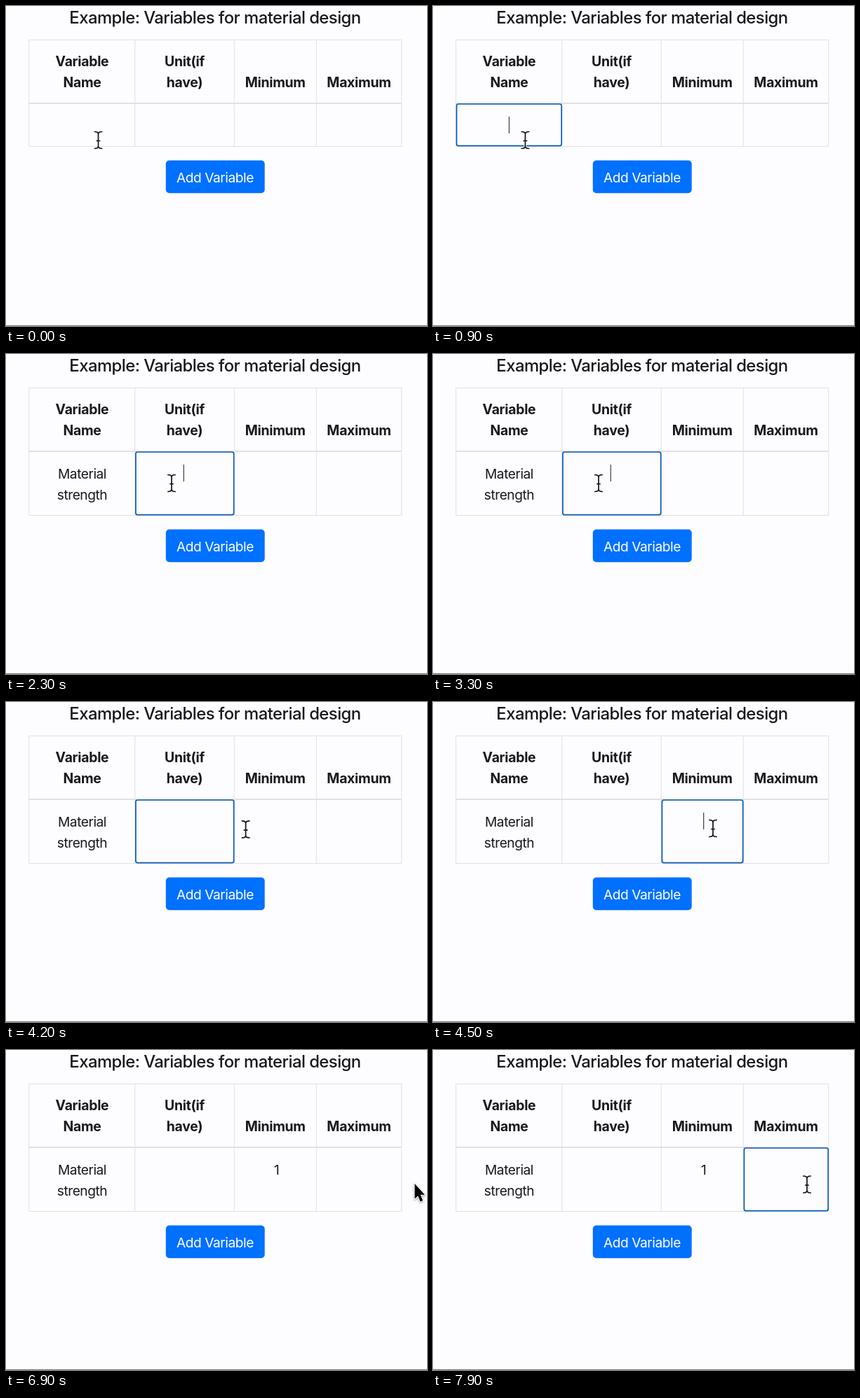
These frames come from a looping animation (600 px wide and 457 px high, 8 s). An HTML page:

```html
<!DOCTYPE html>
<html lang="en">
<head>
<meta charset="utf-8">
<title>Variables table</title>
<style>
  html, body { margin: 0; height: 100%; overflow: hidden; background: #fdfcff; }
  svg { display: block; width: 100%; height: 100%; }
  text {
    font: 400 19.2px Inter, "Open Sans", sans-serif;
    font-optical-sizing: none;
    letter-spacing: -.025em;
    text-anchor: middle;
    fill: #17191c;
  }
  .title { font-size: 23.9px; font-weight: 500; letter-spacing: -.0235em; }
  .head { font-size: 19.4px; font-weight: 700; letter-spacing: -.015em; }
  .label { fill: #fff; }
  .grid { fill: none; stroke: #dee2e6; }
  .ring { fill: none; stroke: #0b5ab2; stroke-width: 1.7; }
  .caret { stroke: #3c3c40; stroke-width: 1.2; }
  .beam { fill: none; stroke-linecap: round; }
</style>
</head>
<body>
<svg viewBox="0 0 600 457">
  <text class="title" x="298" y="25">Example: Variables for material design</text>
  <path id="grid" class="grid"/>
  <path d="M32 139H564" stroke="#dee2e6" stroke-width="2"/>
  <g id="heads"></g>
  <g id="button">
    <rect x="227.8" y="220.6" width="140.9" height="46.6" rx="5" fill="#0070ff"/>
    <text class="label" x="298" y="251.5">Add Variable</text>
  </g>
  <text id="line1" x="108.5" y="177.5"></text>
  <text id="line2" x="108.5" y="207.5"></text>
  <text id="minimum" x="385.7" y="177.5">1</text>
  <rect id="ring" class="ring" y="140" rx="2.5"/>
  <path id="caret" class="caret" d="M0 0V24"/>
  <path d="M0 456.5H600" stroke="#777"/>
  <g id="beam" class="beam">
    <path id="beamHalo" stroke="#fff" stroke-width="3.6"
      d="M-5.2-12C-2-12 0-11 0-8.5V8.5C0 11-2 12-5.2 12M5.2-12C2-12 0-11 0-8.5M5.2 12C2 12 0 11 0 8.5M-2.2 1H2.2"/>
    <path id="beamInk" stroke="#111" stroke-width="1.7"/>
  </g>
  <path id="arrow" d="M0 0V21.5L4.6 17.2L8 25.4L11.6 23.9L8.2 15.8H14.4Z" fill="#000" stroke="#fff"
    stroke-width="2" paint-order="stroke" style="filter: drop-shadow(0 1px 1.5px #0006)"/>
</svg>
<script>
const $ = id => document.getElementById(id);
const set = (el, attrs) => Object.entries(attrs).forEach(([k, v]) => el.setAttribute(k, v));
const show = (el, visible) => set(el, { visibility: visible ? "visible" : "hidden" });

const LOOP = 8000, STEP = 100;
const PHRASE = "Material strength";
const edges = [32.5, 183.8, 325.3, 442.3, 563.8];
const caretCenters = [108.5, 253.3, 385.7, 503];
const headCenters = [108.5, 254.5, 383.7, 503];
const headings = [["Variable", "Name"], ["Unit(if", "have)"], ["", "Minimum"], ["", "Maximum"]];

// Each entry: time, focused column (-1 for none)
const focusChanges = [[0, -1], [600, 0], [2200, 1], [4400, 2], [6800, -1], [7300, 3]];
const caretSpans = [[700, 2200], [2300, 2800], [3300, 3800], [4500, 5000], [5500, 6000], [6300, 6800], [7400, 7900]];
// Each entry: time, x, y
const pointerPath = [
  [0, 131.5, 191.5], [1900, 131.5, 191.5], [2300, 236, 184.5], [3900, 236, 184.5],
  [4400, 399, 180.5], [6600, 399, 180.5], [6900, 582.5, 191], [7100, 582.5, 191],
  [7400, 533, 192], [LOOP, 533, 192]
];

set($("beamInk"), { d: $("beamHalo").getAttribute("d") });
headings.forEach((lines, col) => lines.forEach((line, row) => {
  const text = document.createElementNS("http://www.w3.org/2000/svg", "text");
  set(text, { class: "head", x: headCenters[col], y: 86 + 30 * row });
  text.textContent = line;
  $("heads").append(text);
}));

function pointerAt(t) {
  const next = pointerPath.findIndex(p => p[0] > t);
  const [t0, x0, y0] = pointerPath[next - 1], [t1, x1, y1] = pointerPath[next];
  const u = (t - t0) / (t1 - t0), ease = u * u * (3 - 2 * u);
  return [x0 + (x1 - x0) * ease, y0 + (y1 - y0) * ease];
}

function typedAt(t) {
  const count = Math.max(0, Math.min(13, Math.floor((t - 900) / 38)));
  return t < 1600 ? [PHRASE.slice(0, count).trim(), ""] : PHRASE.split(" ");
}

function draw(t) {
  const wrapped = t >= 1600, bottom = wrapped ? 230.5 : 200.5;
  const columns = edges.slice(1, 4).map(x => `M${x} 48V${bottom}`).join("");
  set($("grid"), { d: `M32.7 48.3H563.8V${bottom}H32.7Z${columns}` });
  set($("button"), { transform: `translate(0 ${wrapped ? 30 : 0})` });

  const [first, second] = typedAt(t);
  $("line1").textContent = first;
  $("line2").textContent = second;
  show($("minimum"), t >= 6300);

  const [since, col] = focusChanges.filter(f => f[0] <= t).pop();
  show($("ring"), col >= 0);
  if (col >= 0) {
    set($("ring"), {
      x: edges[col] + 1.1, width: edges[col + 1] - edges[col] - 1.7,
      height: bottom - 140.9, opacity: t - since < STEP ? 0.5 : 1
    });
    const line = col === 0 ? (second ? $("line2") : $("line1")) : $("minimum");
    const hasText = col === 0 ? first : col === 2 && t >= 6300;
    const offset = hasText ? line.getComputedTextLength() / 2 + 0.5 : 0;
    const caretY = col === 0 && second ? 188 : 158;
    set($("caret"), { transform: `translate(${caretCenters[col] + offset} ${caretY})` });
  }
  show($("caret"), col >= 0 && caretSpans.some(([on, off]) => t >= on && t < off));

  const [x, y] = pointerAt(t), outside = x > 565;
  show($("beam"), !outside);
  show($("arrow"), outside);
  set($(outside ? "arrow" : "beam"), { transform: `translate(${x} ${y})` });
}

const start = performance.now();
function tick() {
  const t = (performance.now() - start) % LOOP;
  draw(Math.floor(t / STEP) * STEP);
  requestAnimationFrame(tick);
}
tick();
</script>
</body>
</html>
```
